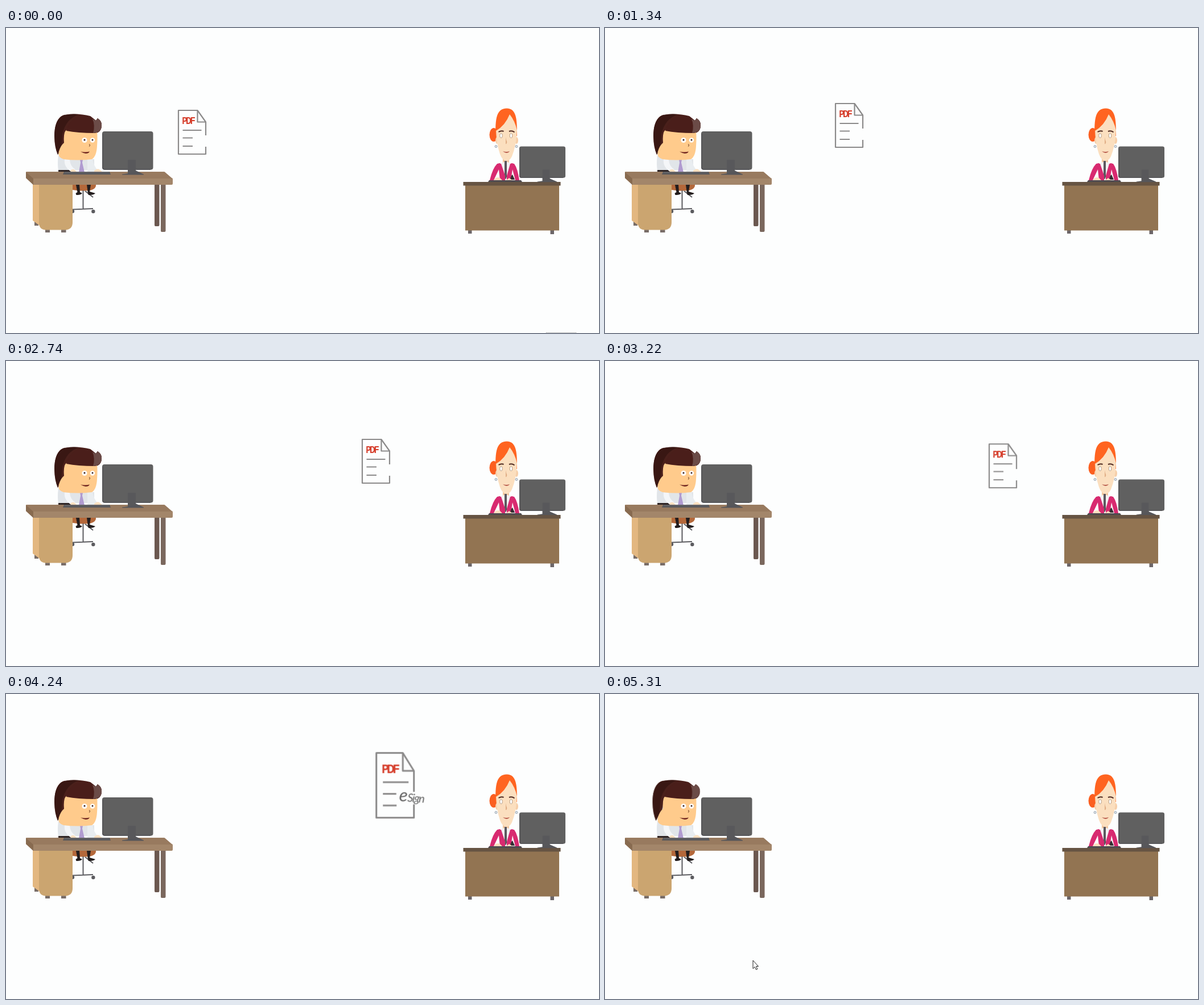
Recreate the animation shown at these times as an HTML page. Size 1042 by 537 pixels, loop 8 s.

```html
<!DOCTYPE html>
<html lang="en">
<head>
<meta charset="utf-8">
<title>Document signing</title>
<style>
html, body { margin: 0; width: 100%; height: 100%; overflow: hidden; background: #fdfefe; }
svg { display: block; width: 100%; height: 100%; }
.pdf { font-family: "Noto Sans Mono", "DejaVu Sans Mono", monospace; font-weight: 700; font-stretch: 75%; fill: #d6402e; }
.sign { font-family: Lato, "Open Sans", sans-serif; font-style: italic; fill: #606060; }
.line { fill: none; stroke: #8b8a8a; stroke-linejoin: round; }

.move { animation: 8s linear infinite; }
.show, .hair { animation: 8s step-end infinite; }
#send { animation-name: send; }
#back { animation-name: back; }
#sendShow { animation-name: sendShow; }
#backShow { animation-name: backShow; }
#cursor { animation-name: cursorShow; }
#dots { animation-name: dotsShow; }
.hair { animation-name: nod; }

@keyframes send {
  0% { transform: translate(302px, 144px); }
  9.125% { transform: translate(302px, 144px); animation-timing-function: steps(9, start); }
  17.65% { transform: translate(404px, 132px); animation-timing-function: steps(5, start); }
  22.55% { transform: translate(477px, 126px); animation-timing-function: steps(5, start); }
  27.46% { transform: translate(551px, 125px); }
  28.25% { transform: translate(551px, 125px); animation-timing-function: steps(7, start); }
  35.19% { transform: translate(625px, 137px); animation-timing-function: steps(11, start); }
  46.125%, 100% { transform: translate(715px, 152px); }
}
@keyframes back {
  0%, 48.125% { transform: translate(706px, 117px); animation-timing-function: steps(11, start); }
  58.65% { transform: translate(602px, 90px); animation-timing-function: steps(8, start); }
  66.375%, 100% { transform: translate(525px, 75px); }
}
@keyframes sendShow { 0% { opacity: 1; } 46.125%, 100% { opacity: 0; } }
@keyframes backShow { 0% { opacity: 0; } 48.125% { opacity: 1; } 66.375%, 100% { opacity: 0; } }
@keyframes cursorShow { 0% { opacity: 0; } 66.375%, 100% { opacity: 1; } }
@keyframes dotsShow { 0% { opacity: 1; } 9.125%, 100% { opacity: 0; } }
@keyframes nod {
  0%, 30% { transform: none; }
  24%, 65%, 100% { transform: translateX(-1.5px); }
}
</style>
</head>
<body>
<svg viewBox="0 0 1042 537" preserveAspectRatio="none">
  <!-- Left: chair and legs -->
  <path d="M117 276H158Q159 283 148 286Q132 288 117 285Z" fill="#b4683a"/>
  <path d="M135.5 286V319M117 319.5L153 318M139 287L153 298" fill="none" stroke="#5b5b5f" stroke-width="2"/>
  <path d="M117 319.5a3.2 3.2 0 0 1 0 6.400z" fill="#5b5b5f"/>
  <circle cx="153.300" cy="323" r="3.200" fill="#5b5b5f"/>
  <path d="M123 276h6l1 13 4 2q-3 3.500-10.500 3l-1-3 3-2zM142 276h7l-2 12 10 3q-3 3.500-12 3l-1-3z" fill="#231d1d"/>

  <!-- Left: man -->
  <path d="M92 249h24l2 6H92z" fill="#2e2424"/>
  <path d="M92 224Q90 240 92 250H155V231Z" fill="#e1e5e9"/>
  <path d="M103 231Q101 245 116 254L122 249Q113 244 112 232Z" fill="#f4f6f8"/>
  <path d="M152 231Q154 242 160 249L154 254H143V231Z" fill="#e9edf0"/>
  <path d="M130 232h5l-1 5 4 17h-10l3-17z" fill="#b09bd0"/>
  <path d="M113 251q4-4 8-1l5 5h-11zM155 251q5-4 9-2l5 4-3 1h-11z" fill="#fde0c0"/>
  <g class="hair">
    <path d="M91 223Q83 205 86 178Q89 157 102 153Q126 149 148 155L158 163L161 159Q169 164 168 173Q167 183 158 185H106L102 204Z" fill="#4a201b"/>
    <path d="M99 187Q105 160 128 152Q107 150 97 156Q85 165 85 190Q86 210 91 223L97 211Z" fill="#391713"/>
  </g>
  <path d="M103 184Q106 177 112 180Q138 186 160 181Q161 194 160 208Q159 226 151 231Q126 234 101 231Q90 228 93 217Q96 207 102 202Q101 191 103 184Z" fill="#ffcb8c"/>
  <g class="hair">
    <path d="M106 181Q112 160 132 153L149 156L158 163L161 159Q169 164 168 173Q167 184 156 185Q126 185 106 181Z" fill="#4a1e1a"/>
    <path d="M152 160L158 163L161 159Q169 164 168 173Q167 184 153 185Q157 172 152 160Z" fill="#6b4b47"/>
  </g>
  <g fill="#fff"><circle cx="138" cy="197.500" r="4.600"/><circle cx="152" cy="197.500" r="4.200"/></g>
  <g fill="#3d2420"><circle cx="138" cy="197" r="1.600"/><circle cx="152" cy="197" r="1.500"/></g>
  <path d="M146 204.500q3 2 0 4" fill="none" stroke="#8a5a38" stroke-width="1.200"/>
  <path d="M131 217.500q8 2 16 0-2 3.500-7 3.500-5-1-9-3.500z" fill="#6d231d"/>

  <!-- Left: desk -->
  <g fill="#6b5850">
    <path d="M261 274h8.500v73q0 2-2 2h-5q-1.500 0-1.500-2z"/>
    <path d="M272 274h8.500v83q0 2-2 2h-5q-1.500 0-1.500-2z" fill="#7a675d"/>
    <path d="M50 338h7v10h-7zM69 353h8v7h-8zM97 353h8.500v7H97z" fill="#786d68"/>
  </g>
  <path d="M47 274H62V350L47 339Z" fill="#e3b780"/>
  <path d="M58 274H117V342Q117 355 104 355.500H70Q58 355 58 343Z" fill="#cba570"/>
  <path d="M35 254Q35 253 37 253H278L291 264Q293 264 293 266V274Q293 276 291 276H48L35 264Z" fill="#a3866a"/>
  <path d="M35 253.500H279L292 265H48Z" fill="#987a5f"/>
  <path d="M35 253.500L48 265V276L35 264Z" fill="#886b50"/>
  <path d="M102 253H182L184 258H100Z" fill="#59595c"/>
  <path d="M103 254H181" stroke="#717174"/>

  <!-- Monitor, shared by both desks -->
  <defs>
    <g id="monitor">
      <path d="M45 50H59V69L73 75.500V76.500H35V75.500L45 74Z" fill="#56565a"/>
      <rect width="89.500" height="67.500" rx="4" fill="#606060"/>
      <path d="M1 4V63Q1 67 5 67H85" fill="none" stroke="#515155" stroke-width="1.500"/>
      <path d="M45 50H59V71L45 74Z" fill="#58585b"/>
    </g>
  </defs>
  <use href="#monitor" x="169" y="182"/>

  <!-- Right: woman -->
  <ellipse cx="857" cy="188" rx="7.500" ry="12" fill="#fb5f20"/>
  <path d="M860 190C860 160 861 142 880 141.500C897 142 898 160 898 190Z" fill="#ff6420"/>
  <g fill="#f6cfa9"><ellipse cx="863" cy="198" rx="3" ry="6"/><ellipse cx="897" cy="198" rx="3" ry="6"/></g>
  <path d="M873 225H884V241L878 247L873 241Z" fill="#f0c69f"/>
  <path d="M861 181Q877 172 885 152Q894 163 898 180Q897 206 889 226Q885 234 879 234Q872 233 868 222Q862 204 861 181Z" fill="#fbdfbf"/>
  <path d="M879 197Q882 203 878 204.500V192Z" fill="#e0ae86"/>
  <path d="M865.500 183q5-3 9-1M884 182q5-2 9.500 1.500" fill="none" stroke="#4d2820" stroke-width="2"/>
  <g fill="#fff" stroke="#b69b82">
    <ellipse cx="870" cy="189.500" rx="2.300" ry="4"/><ellipse cx="887.500" cy="189.500" rx="2.300" ry="4"/>
  </g>
  <path d="M873 217q6 2 12 0-2 3-6 3-4-1-6-3z" fill="#b75a4b"/>
  <g fill="#dfe5ea" stroke="#98a4b0"><circle cx="861" cy="208.500" r="2"/><circle cx="897" cy="208.500" r="2"/></g>
  <path d="M870 238L878 235L887 238L880 264H876Z" fill="#f3f2f3"/>
  <path d="M876 234H880V262L878 267L876 262Z" fill="#5b575e"/>
  <g fill="#d82a70">
    <path d="M863 239L868 238L866 249L857 268H850Q855 247 863 239Z"/>
    <path d="M893 239L888 238L890 249L895 268H902Q899 247 893 239Z"/>
    <path d="M866 238L870 239L877 260V268H868L866 249Z"/>
    <path d="M890 238L886 239L880 260V268H887L890 249Z"/>
  </g>
  <path d="M886 267q1-7 4-9l4 9z" fill="#352d33"/>
  <path d="M858 266q5-5 10-2l4 4h-14zM884 264l6 4h-11z" fill="#fbdfbf"/>

  <!-- Right: desk -->
  <path d="M812 355h6.500v7H812zM956.500 355h6.500v8h-6.500z" fill="#6c6669"/>
  <rect x="807" y="276" width="165" height="80.500" fill="#927452"/>
  <rect x="803.500" y="271" width="171" height="6.500" fill="#665443"/>
  <path d="M849 268H905L907 271H847Z" fill="#4f4b50"/>
  <use href="#monitor" transform="translate(902 208.500) scale(.905 .82)"/>

  <!-- Travelling documents -->
  <g id="sendShow" class="show">
    <g id="send" class="move">
      <path d="M49 65V78H1V1H34.500L49 21.500V45" class="line" stroke-width="2.200"/>
      <path d="M34.500 1V21.500H49M8.500 36H41.500M8.500 49.500H26M8.500 64H26" class="line" stroke-width="2.200"/>
      <text class="pdf" x="7" y="24.500" font-size="16" letter-spacing="-2.300">PDF</text>
    </g>
  </g>
  <g id="backShow" class="show">
    <g id="back" class="move">
      <path d="M67.500 92V115.500H1.500V1.500H48L67.500 33V70" class="line" stroke-width="3"/>
      <path d="M48 1.500V33H67.500M13 53H58M13 73.500H36.500M13 94H37" class="line" stroke-width="3"/>
      <text class="pdf" x="10.500" y="36.500" font-size="22" letter-spacing="-3.400">PDF</text>
      <text class="sign" x="41" y="86" font-size="31" transform="rotate(4 41 86)">e<tspan font-size="20" letter-spacing="-1.500">Sign</tspan></text>
    </g>
  </g>

  <path id="dots" class="show" d="M949 536.500H1002" stroke="#777" stroke-dasharray="1 1"/>
  <path id="cursor" class="show" d="M260 469V483.500L263.300 480.500L265.500 485.300L267.800 484.300L265.700 479.500H269.500Z" fill="#fff" stroke="#222" stroke-width="1"/>
</svg>
</body>
</html>
```
